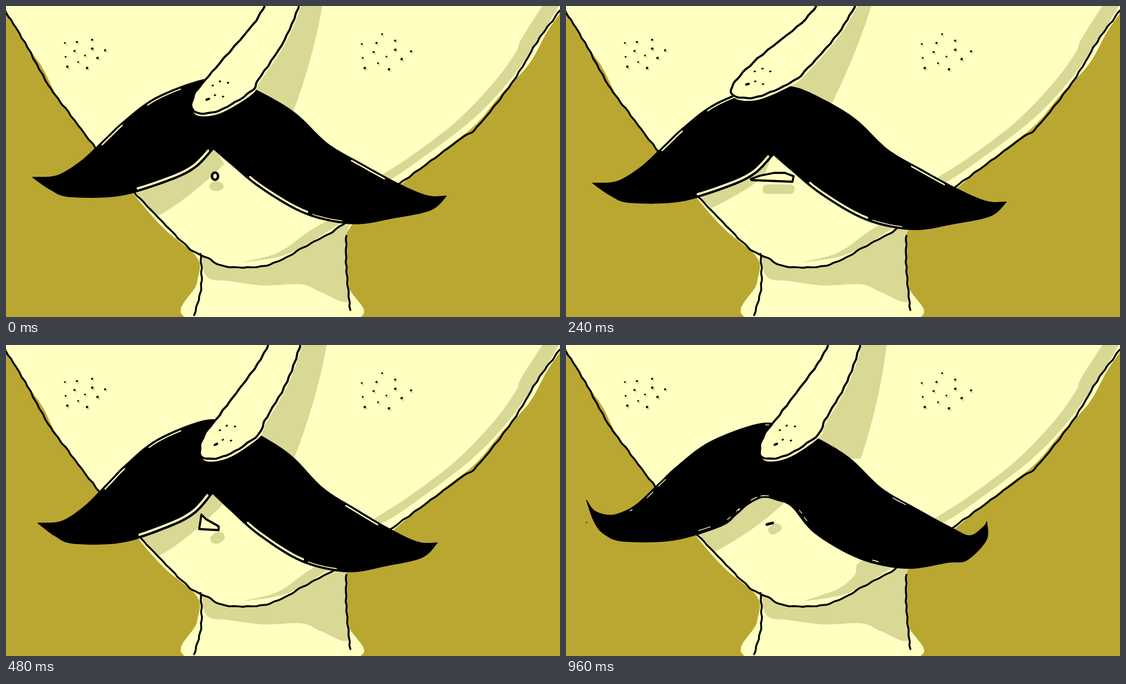
Recreate the animation shown at these times as an HTML page with a canvas. Size 998 by 561 pixels, loop 1120 ms.

```html
<!DOCTYPE html>
<html lang="en">
<head>
<meta charset="utf-8">
<title>Moustache</title>
<style>
html, body { margin: 0; width: 100%; height: 100%; overflow: hidden; background: #baa731; }
canvas { display: block; width: 998px; height: 561px; }
</style>
</head>
<body>
<canvas id="stage" width="998" height="561"></canvas>
<script>
const ctx = document.getElementById('stage').getContext('2d');
const OLIVE = '#baa731', SKIN = '#ffffc2', SHADE = '#d9d894', INK = '#000';
const STEP = 80, LOOP = 1120, LAST = 12;

const lerp = (a, b, t) => a + (b - a) * t;

// Samples a Catmull-Rom curve through flat x, y pairs, eight points per span.
function spline(flat) {
  const n = flat.length / 2, out = [];
  const at = (i, axis) => flat[2 * Math.max(0, Math.min(n - 1, i)) + axis];
  const blend = (i, t, axis) => {
    const [a, b, c, d] = [-1, 0, 1, 2].map(k => at(i + k, axis));
    return b + t * (c - a + t * (2 * a - 5 * b + 4 * c - d + t * (3 * (b - c) + d - a))) / 2;
  };
  for (let i = 0; i < n - 1; i++)
    for (let s = 0; s < 8; s++) out.push([blend(i, s / 8, 0), blend(i, s / 8, 1)]);
  out.push([at(n - 1, 0), at(n - 1, 1)]);
  return out;
}

// Moves a curve to its right-hand side.
function inset(points, d) {
  return points.map(([x, y], i) => {
    const a = points[Math.max(0, i - 1)], b = points[Math.min(points.length - 1, i + 1)];
    const dx = b[0] - a[0], dy = b[1] - a[1], len = Math.hypot(dx, dy) || 1;
    return [x - dy / len * d, y + dx / len * d];
  });
}

function trace(points) {
  ctx.beginPath();
  points.forEach(p => ctx.lineTo(...p));
}
function fill(color) { ctx.fillStyle = color; ctx.fill(); }
function stroke(w, color = INK) { ctx.lineWidth = w; ctx.strokeStyle = color; ctx.stroke(); }
function shape(points, color) { trace(points); fill(color); }
function handLine(points, w = 3.4) {
  trace(points.map(([x, y]) => [x + .8 * Math.sin(y * .31), y + .6 * Math.sin(x * .27)]));
  stroke(w);
}
function oval(x, y, rx, ry, color, turn = 0) {
  ctx.beginPath();
  ctx.ellipse(x, y, rx, ry, turn, 0, 7);
  fill(color);
}

const skin = spline([-12, -12, -2, 4, 34, 66, 66, 112, 106, 184, 228, 337, 285, 402, 345, 455, 344, 500, 333, 565,
  627, 565, 615, 500, 615, 407, 700, 332, 790, 258, 846, 214, 893, 158, 942, 105, 974, 48, 1000, 8, 1000, -12]);
const jawLeft = spline([-2, 8, 34, 66, 76, 142, 112, 191, 163, 258, 218, 322, 267, 374, 322, 430, 345, 447]);
const chin = spline([345, 447, 366, 456, 395, 470, 458, 470, 498, 457, 540, 433, 580, 412, 607, 394, 692, 333]);
const jawRight = spline([692, 333, 766, 279, 821, 238, 849, 218, 912, 138, 954, 69, 968, 48, 999, 7]);
const cheekShade = spline([966, 0, 928, 60, 918, 84, 878, 139, 808, 211, 722, 276, 664, 314,
  684, 318, 754, 271, 840, 205, 900, 143, 952, 72, 996, 0]);
const neckShade = spline([352, 452, 357, 480, 370, 493, 400, 496, 463, 504, 532, 502, 565, 515, 617, 533,
  613, 470, 614, 410, 622, 392]);
const neckSides = [[350, 447, 352, 470, 351, 512, 339, 558], [613, 414, 613, 470, 620, 549]].map(spline);
const chinEdge = [645, 362, 560, 419, 500, 450, 430, 462];
const chinThin = spline([430, 461, 490, 445, 545, 407, 580, 387, 645, 355, ...chinEdge]);
const chinWide = spline([430, 461, 490, 440, 520, 415, 535, 388, 645, 355, ...chinEdge]);

// The nose swings between these two outlines.
const noseUp = [456, -8, 425, 30, 345, 95, 302, 140, 303, 162, 345, 164, 405, 138, 430, 118, 490, 50, 525, -8];
const noseDown = [480, -8, 460, 35, 401, 124, 366, 175, 366, 212, 410, 207, 465, 168, 475, 140, 510, 70, 535, -8];

// Both moustaches share a body; only the tips and the notch differ.
const ridge = [140, 276, 180, 238, 212, 208, 270, 165, 355, 133, 405, 135, 447, 150, 518, 191, 579, 248, 640, 284, 708, 321];
const bellyRight = [700, 382, 625, 393, 541, 376, 460, 330];
const bellyLeft = [290, 317, 205, 342, 115, 344, 80, 331];
const straight = [
  [48, 309, 82, 308, 105, 300, ...ridge, 758, 342, 793, 343],
  [793, 343, 765, 368, ...bellyRight, 405, 285, 374, 258],
  [374, 258, 340, 293, ...bellyLeft, 48, 309]].map(spline);
const curled = [
  [48, 270, 62, 289, 88, 297, 112, 292, ...ridge, 739, 334, 763, 318, 769, 309],
  [769, 309, 768, 342, 733, 378, ...bellyRight, 418, 282, 391, 270, 366, 265, 340, 277, 318, 296,
    ...bellyLeft, 62, 309, 48, 270]].map(spline);

const base = { swing: .81, foot: 531, x: 363, y: 270, w: 1, h: 1, cheekX: 268, bend: 340, cheekEnd: 393 };
const keys = [
  { at: 0, mouth: 'round', swing: .58, foot: 512, x: 374, y: 260, cheekX: 273, bend: 345 },
  { at: 2, mouth: 'flat', swing: .49, foot: 490, x: 372, y: 260, w: 1.097, h: .8, cheekX: 260, bend: 304 },
  { at: 3, mouth: 'flat', swing: 0, foot: 464, x: 374, y: 270.5, cheekX: 262, bend: 330, cheekEnd: 358 },
  { at: 5, mouth: 'wedge', swing: 1, foot: 521, x: 377, w: .948, h: 1.07, cheekX: 278 },
  { at: 8, mouth: 'dash', curl: true, wide: true, swing: .44, foot: 514, bend: 362 },
  { at: 10, mouth: 'dash', wide: true },
  { at: 12, mouth: 'dash', wide: true, curl: true }
].map(k => ({ ...base, ...k }));

// Numbers glide between keys; mouth and curl switch.
function poseAt(step) {
  const i = keys.findLastIndex(k => k.at <= step);
  const a = keys[i], b = keys[i + 1] || a, pose = { ...a };
  const t = b === a ? 0 : (step - a.at) / (b.at - a.at);
  for (const name in base) pose[name] = lerp(a[name], b[name], t);
  return pose;
}

function random(seed) {
  return () => (seed = seed * 16807 % 2147483647) / 2147483647;
}

function freckles(x, y, rx, ry, count) {
  for (let i = 0; i < count; i++) {
    const r = Math.sqrt((i + .4) / count), a = i * 2.4 + 1;
    const px = x + rx * r * Math.cos(a), py = y + ry * r * Math.sin(a);
    const size = 1.4 + i % 3 * .3;
    oval(px + 2, py + 3, size + .8, size, SHADE);
    oval(px, py, size + .4, size, INK, -.4);
  }
}

function drawFace(wide) {
  ctx.fillStyle = OLIVE;
  ctx.fillRect(0, 0, 998, 561);
  shape(skin, SKIN);
  shape(cheekShade, SHADE);
  shape(neckShade, SHADE);
  shape(chin, SKIN);
  shape(wide ? chinWide : chinThin, SHADE);
  freckles(138, 84, 44, 34, 12);
  freckles(680, 86, 56, 36, 13);
}

function drawSoftShades(p) {
  const top = lerp(550, 584, p.swing);
  ctx.beginPath();
  ctx.moveTo(lerp(522, 533, p.swing), 0);
  ctx.lineTo(top, 0);
  ctx.quadraticCurveTo((top + p.foot) / 2 + 11, 102, p.foot, 205);
  ctx.lineTo(400, 205);
  ctx.lineTo(lerp(405, 466, p.swing), lerp(138, 168, p.swing));
  fill(SHADE);

  ctx.beginPath();
  ctx.moveTo(225, 328);
  ctx.lineTo(p.cheekX, 362 + (p.cheekX - 260) * 1.33);
  ctx.quadraticCurveTo(333, p.bend, p.cheekEnd, 285 + (393 - p.cheekEnd) * .55);
  ctx.lineTo(p.x, p.y - 8);
  fill(SHADE);
}

function outline(...flat) {
  ctx.beginPath();
  for (let i = 0; i < flat.length; i += 2) ctx.lineTo(flat[i], flat[i + 1]);
  ctx.closePath();
  fill(SKIN);
  stroke(3.8);
}
const mouths = {
  round() {
    oval(379, 325, 13, 9, SHADE);
    oval(376.5, 307, 5.5, 6.5, SKIN);
    stroke(4.5);
  },
  flat() {
    ctx.beginPath();
    ctx.roundRect(354, 322, 58, 17, 8);
    fill(SHADE);
    outline(333, 312, 350, 306, 375, 301, 394, 301, 410, 307, 408, 317, 334, 314);
  },
  wedge() {
    oval(381, 348, 13.5, 10, SHADE, -.4);
    outline(352, 306, 360, 314, 383, 327, 383, 334, 348, 332);
  },
  dash() {
    oval(373, 334, 9, 8, SHADE);
    oval(379, 330, 9.5, 8, SHADE);
    handLine([[362, 324], [367, 323], [373, 321]], 5);
  }
};

// A pale streak just inside an edge, between two of its key points.
function gap(edge, from, to, d, w) {
  trace(inset(edge, d).slice(Math.round(from * 8), Math.round(to * 8)));
  stroke(w, SKIN);
}

function drawMoustache({ curl, x, y, w, h }) {
  const edges = curl ? curled : straight;
  ctx.save();
  ctx.translate(x, y);
  ctx.scale(w, h);
  ctx.translate(-374, -260);
  shape(edges.flat(), INK);
  stroke(1.5);
  if (curl) {
    const rnd = random(77);
    for (let i = 0; i < 22; i++) {
      const from = 3.5 + rnd() * 9;
      gap(edges[i % 2], from, from + .25 + rnd() * .3, 3 + rnd() * 3, 1.3);
    }
  } else {
    const [top, right, left] = edges;
    gap(top, 3.8, 5, 4, 2.5);
    gap(top, 5.7, 6.6, 4, 2);
    gap(top, 11.8, 12.7, 4, 2.5);
    gap(right, 3.2, 4, 4, 1.5);
    gap(right, 4, 5.5, 5, 3.5);
    gap(left, .3, 2.7, 5.5, 4);
  }
  ctx.restore();
  if (curl) oval(37, 320, 1, 1, INK);
}

function drawNose(swing) {
  const nose = spline(noseUp.map((n, i) => lerp(n, noseDown[i], swing)));
  shape(nose.map(([x, y]) => [x + 2, y + 5]), SKIN);
  shape(nose, SKIN);
  handLine(nose, 3.8);
  ctx.save();
  ctx.translate(lerp(327, 390, swing), lerp(141, 188, swing));
  ctx.rotate(-.3 * swing);
  for (let row = 0; row < 2; row++)
    for (let i = 0; i < 3; i++) {
      const first = !row && !i;
      oval(i * 14 + row * 13, row * -23 - i % 2 * 5, first ? 4.5 : 2.2, first ? 2.2 : 1.5, INK, -.2);
    }
  ctx.restore();
}

function draw(step) {
  const pose = poseAt(step);
  drawFace(pose.wide);
  drawSoftShades(pose);
  [jawLeft, chin, jawRight, ...neckSides].forEach(points => handLine(points));
  mouths[pose.mouth]();
  drawMoustache(pose);
  drawNose(pose.swing);
}

ctx.lineJoin = ctx.lineCap = 'round';
function tick() {
  draw(Math.min(LAST, Math.floor(performance.now() % LOOP / STEP)));
  requestAnimationFrame(tick);
}
tick();
</script>
</body>
</html>
```
